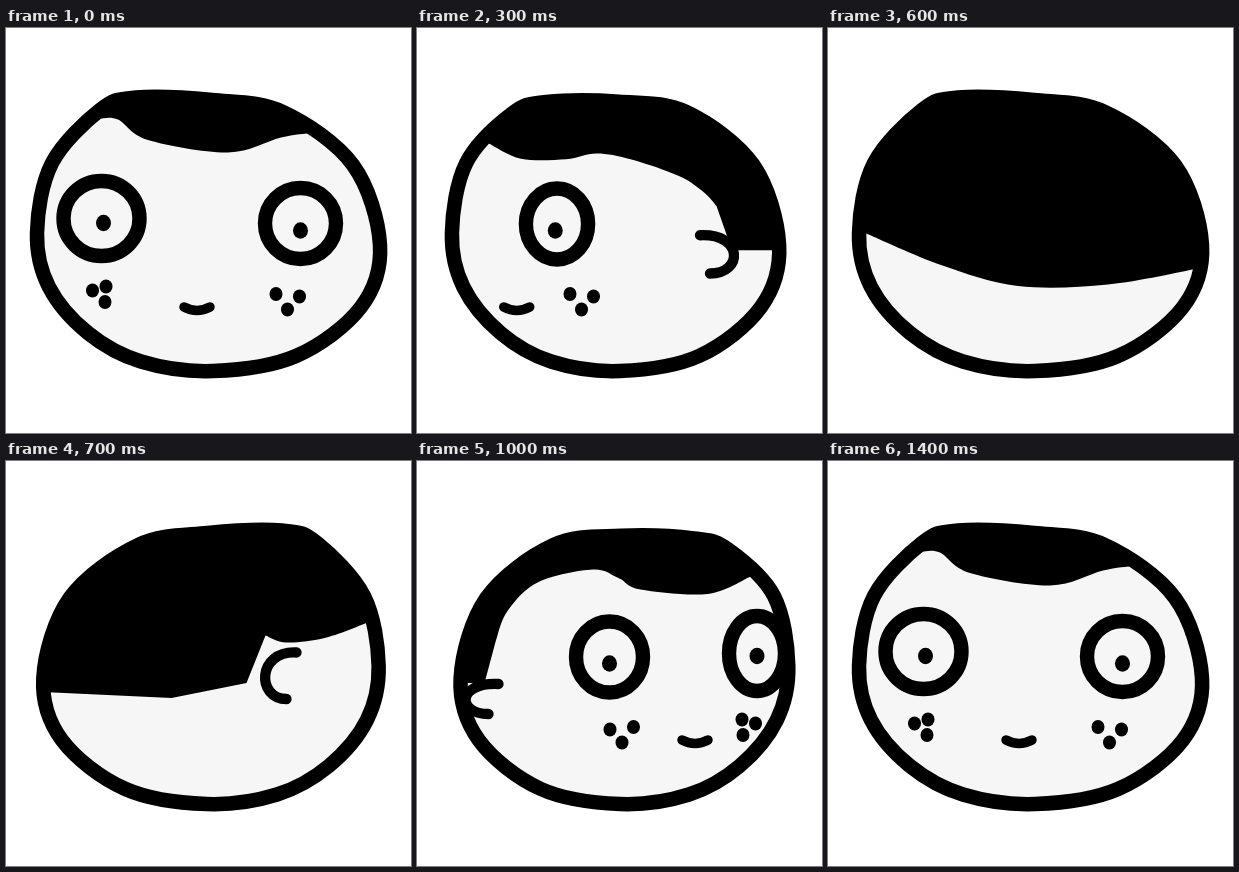
An HTML page that plays this animation: 405x405 px, repeating every 1.5 s.

```html
<!DOCTYPE html>
<html lang="en">
<head>
<meta charset="utf-8">
<title>Turning head</title>
<style>
  html, body { margin: 0; width: 100%; height: 100%; overflow: hidden; background: #fff; }
  svg { display: block; width: 100%; height: 100%; }
</style>
</head>
<body>
<svg id="stage" viewBox="0 0 405 405"></svg>
<script>
const STEP = 100;
const GREY = '#f6f6f6';

// Key points on the middle of the head's outline, seen from the front.
const HEAD = [[130, 69.5], [206, 72], [277, 84], [347, 137], [374, 217], [355, 279], [290, 328],
  [207, 343], [135, 333.5], [82, 305], [43, 259], [31, 205], [46, 135], [94, 82]];

// eyes: x, y, radius, pupil offset; ear: x, y, bulge, height;
// hair is a smooth line that goes on straight along edge.
const blank = { skin: GREY, left: 24, width: 358, drop: 0, eyes: [], spots: [], edge: [] };
const front = {
  ...blank,
  hair: [[94, 90.5], [112, 91.5], [142, 112], [222, 124.5], [275, 109.5], [305, 105]],
  eyes: [[95.5, 190.5, 38, 2], [294.5, 195.5, 35.5, 0]],
  spots: [86.5, 281.5], mouth: 178
};
const slight = {
  ...blank, skin: '#fff', left: 27.5, width: 342, drop: 0.5,
  hair: [[95, 92.5], [112, 114], [160, 128], [222, 114.5], [250, 108], [306, 128.5], [341, 190]],
  edge: [[348, 222]],
  eyes: [[84.5, 195.5, 32.5, -4], [243.5, 196, 33.5, -0.5]],
  spots: [78, 231], mouth: 146, ear: [338, 223, 27, 30]
};
const half = {
  ...blank, left: 27.5, width: 342, drop: 8,
  hair: [[72, 115.5], [115, 133], [182, 128.5], [204, 117], [230, 108.5], [284, 121], [315, 150], [327, 181]],
  edge: [[338, 222]],
  eyes: [[65.5, 192.5, 28, 0], [213, 196, 33.5, 0]],
  spots: [67, 200.5], mouth: 114.5, ear: [324, 223, 42, 30]
};
const side = {
  ...blank, left: 29, width: 341, drop: 1,
  hair: [[71, 115], [93, 128.5], [116, 134], [155, 134], [199, 154.5], [240, 175], [258, 178], [272, 175]],
  edge: [[292, 222.5]],
  eyes: [[-60, 196, 28, 0], [67, 196, 28.7, -3.5]],
  spots: [-40, 128.5], mouth: 59, ear: [242, 191.5, 45, 46.5]
};
const rear = {
  ...blank, left: 26, width: 350,
  hair: [[40, 160], [85, 176.5], [125, 181.5], [146, 174.5]],
  edge: [[165, 222], [240, 237], [370, 231]],
  ear: [115, 191.5, 40, 46.5]
};
const back = {
  ...blank,
  hair: [[36, 204.5], [113, 237], [190, 258], [280, 256.5], [370, 240.5]]
};

const mid = (a, b) =>
  typeof a === 'number' ? (a + b) / 2 :
  Array.isArray(a) ? a.map((v, i) => mid(v, b[i])) :
  typeof a === 'object' ? Object.fromEntries(Object.keys(a).map(k => [k, mid(a[k], b[k])])) : a;

// Turn away to the left, come back mirrored on the right, then rest.
const away = [front, slight, half, mid(half, side), side, rear];
const home = away.slice(1).reverse().map(pose => ({ ...pose, flip: true }));
const poses = [...away, back, ...home, front, front, front];

// Catmull-Rom curve through the points.
function smooth(pts, closed) {
  const n = pts.length;
  const at = i => pts[closed ? (i + n) % n : Math.min(Math.max(i, 0), n - 1)];
  const handle = (i, sign) => at(i).map((v, k) => v + sign * (at(i + 1)[k] - at(i - 1)[k]) / 6);
  let d = 'M' + pts[0];
  for (let i = 0; i < (closed ? n : n - 1); i++) {
    d += `C${handle(i, 1)} ${handle(i + 1, -1)} ${at(i + 1)}`;
  }
  return closed ? d + 'Z' : d;
}

function outline({ left, width, drop }) {
  const sink = (x, y) => y < 100 ? drop * Math.exp(-(((x - 130) / 75) ** 2)) : 0;
  const pts = HEAD.map(([x, y]) => [left + (x - 24) * width / 358, y + sink(x, y)]);
  return smooth(pts, true);
}

function hairShape({ hair, edge }) {
  const [x, y] = hair[0];
  const tail = edge.map(p => 'L' + p).join('');
  return `${smooth(hair)}${tail}H410V0H${x - 30}V${y - 25}Z`;
}

const oval = (x, y, rx, ry, extra = '') =>
  `<ellipse cx="${x}" cy="${y}" rx="${rx}" ry="${ry}" ${extra}/>`;

const line = (d, w, fill = 'none') =>
  `<path d="${d}" fill="${fill}" stroke="#000" stroke-width="${w}" stroke-linecap="round"/>`;

const eye = ([x, y, r, look], i) =>
  oval(x, y, r, i ? 35.5 : 37.5, 'fill="none" stroke="#000" stroke-width="14.4"') +
  oval(x + look, i ? 202.5 : 195, 7.5, 8.2);

const SPOTS = [
  [[0, 262.5], [13.5, 258.5], [12.5, 274]],
  [[-11.5, 266], [12, 268.5], [0, 281.5]]
];
const spots = (x, i) => SPOTS[i].map(([dx, y]) => oval(x + dx, y, 6.5, 7)).join('');

const ear = ([x, y, bulge, h], skin) =>
  line(`M${x} ${y}c${bulge} -2 ${bulge} ${h} 10 ${h}`, 10.3, skin);

function draw(pose) {
  const head = outline(pose);
  return `<clipPath id="head"><path d="${head}"/></clipPath>
    <g transform="${pose.flip ? 'translate(405.5 0) scale(-1 1)' : ''}">
      <g clip-path="url(#head)">
        <path d="${head}" fill="${pose.skin}"/>
        <path d="${hairShape(pose)}"/>
        ${pose.eyes.map(eye).join('')}
        ${pose.spots.map(spots).join('')}
        ${pose.mouth ? line(`M${pose.mouth} 279q13 7 26 0`, 9.5) : ''}
      </g>
      ${line(head, 14.5)}
      ${pose.ear ? ear(pose.ear, pose.skin) : ''}
    </g>`;
}

const stage = document.getElementById('stage');
let shown = -1;

function tick(now) {
  const i = Math.floor(now / STEP) % poses.length;
  if (i !== shown) {
    stage.innerHTML = draw(poses[i]);
    shown = i;
  }
  requestAnimationFrame(tick);
}
tick(0);
</script>
</body>
</html>
```
